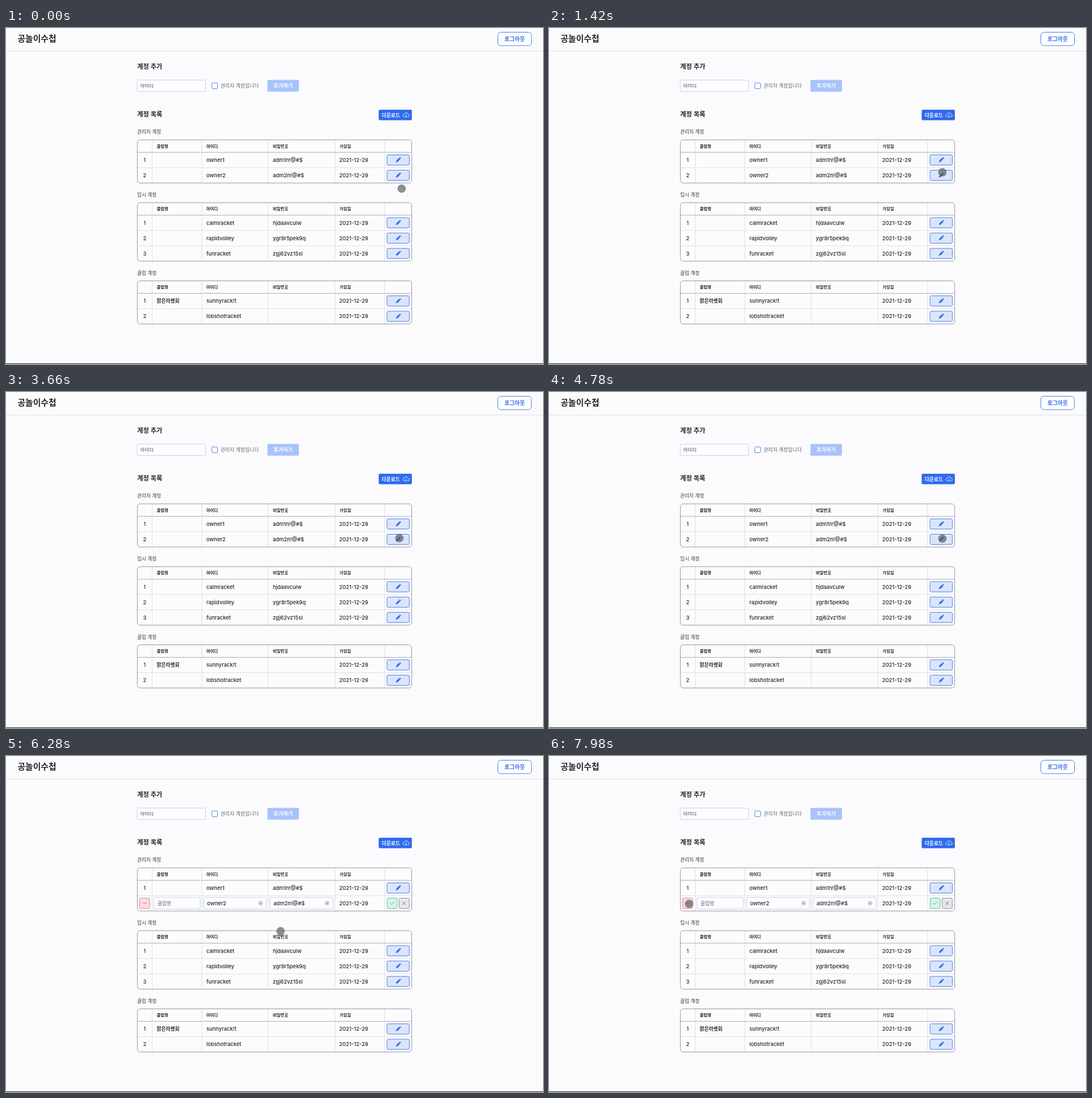
Write an HTML page that moves like this. It is 946 by 592 pixels and loops after 8 s.

```html
<!DOCTYPE html>
<html lang="ko">
<head>
<meta charset="utf-8">
<style>
  html, body { margin: 0; width: 100%; height: 100%; overflow: hidden; background: #fbfbfd; }
  svg { display: block; width: 946px; height: 592px; }
  text { font-family: Inter, "Noto Sans CJK KR", "Noto Sans CJK", sans-serif; white-space: pre; }
</style>
</head>
<body>
<svg id="stage" viewBox="0 0 946 592"></svg>
<script>
const LOOP = 8000;
const EDIT_AT = 5240;
const INK = '#25262b', BLUE = '#2f6bed';
const COLUMNS = [257.5, 345, 462, 579.5, 667];
const HEADINGS = ['클럽명', '아이디', '비밀번호', '가입일'];
const DATE = '2021-12-29';

// y is the vertical centre of the line
const text = (x, y, label, size, { weight = 500, fill = INK, anchor = 'start' } = {}) =>
  `<text x="${x}" y="${y + size * 0.37}" font-size="${size}" font-weight="${weight}" fill="${fill}" text-anchor="${anchor}">${label}</text>`;
const box = (x, y, w, h, r, fill, stroke = 'none', width = 1) =>
  `<rect x="${x}" y="${y}" width="${w}" height="${h}" rx="${r}" fill="${fill}" stroke="${stroke}" stroke-width="${width}"/>`;
const path = (d, stroke, width = 1, fill = 'none') =>
  `<path d="${d}" fill="${fill}" stroke="${stroke}" stroke-width="${width}" stroke-linecap="round" stroke-linejoin="round"/>`;
const rule = (x1, y1, x2, y2, stroke) => path(`M${x1} ${y1}L${x2} ${y2}`, stroke, 0.9);
const cross = (x, y, r, stroke, width) =>
  path(`M${x - r} ${y - r}l${2 * r} ${2 * r}m0 ${-2 * r}l${-2 * r} ${2 * r}`, stroke, width);

const pencil = y => `<g transform="translate(691 ${y}) rotate(45)" fill="${BLUE}">
  <rect x="-1.6" y="-5.6" width="3.2" height="1.9" rx=".7"/>
  <path d="M-1.6-3.1h3.2v6.1L0 6l-1.6-3z"/></g>`;

function row(y, number, [club, id, password]) {
  return text(244.3, y, number, 9.3, { anchor: 'middle' }) +
    text(265.5, y, club, 8.7, { weight: 600 }) +
    text(353, y, id, 9.4) + text(470, y, password, 9.4) + text(587, y, DATE, 9.4) +
    box(671.2, y - 8.9, 39.3, 18, 2, '#dbe5fa', '#4a7fe8') + pencil(y);
}

function editor(y, [, id, password]) {
  const field = (x, w, label, size, fill) =>
    box(x, y - 10.2, w, 20.4, 2, '#fdfdff', '#c3cff0') + text(x + 6, y, label, size, { fill });
  const clear = x => `<circle cx="${x}" cy="${y}" r="4.2" fill="#d3d4d9"/>` + cross(x, y, 1.5, '#85868c', 0.7);
  return box(235.5, y - 9, 17.5, 18.2, 2, '#fadde2', '#e4808f') +
    path(`M241.4 ${y}h5.8`, '#d95d70', 0.9) +
    field(260.7, 81.3, '클럽명', 8.8, '#66676d') +
    field(348.2, 110.8, id, 9.4, INK) + clear(448.5) +
    field(465.3, 110.8, password, 9.4, INK) + clear(565.6) +
    text(587, y, DATE, 9.4) +
    box(671.5, y - 9, 17.5, 18.2, 2, '#d8f4e9', '#50c69b') +
    path(`M677.3 ${y + .2}l2.1 2.1 4-4.4`, '#25ae7b', 0.9) +
    box(692.7, y - 9, 17.6, 18.2, 2, '#e7e8ec', '#8c8e96') + cross(701.4, y, 2.7, '#63656d', 0.9);
}

function table(top, title, rows) {
  const head = top + 22, bottom = head + 27 * rows.length;
  const edited = title === '관리자 계정' ? rows.length - 1 : -1;
  let out = text(231, top - 14, title, 8.7, { fill: '#3c3d43' }) +
    box(231.4, top, 483.3, bottom - top, 5, '#fcfcfe');
  COLUMNS.forEach(x => out += rule(x, top, x, bottom, '#dcdde1'));
  HEADINGS.forEach((label, i) => out += text(COLUMNS[i] + 8, top + 10.7, label, 7.4, { weight: 600 }));
  rows.forEach((cells, i) => {
    const y = head + 27 * i + 13.3;
    if (i) out += rule(231.4, head + 27 * i, 714.7, head + 27 * i, '#dcdde1');
    out += i === edited
      ? `<g id="idle">${row(y, i + 1, cells)}</g><g id="editing">${editor(y, cells)}</g>`
      : row(y, i + 1, cells);
  });
  return out + rule(231.4, head, 714.7, head, '#a3a4a9') +
    box(231.4, top, 483.3, bottom - top, 5, 'none', '#96979d');
}

document.getElementById('stage').innerHTML =
  box(0, 0, 946, 592, 0, '#fbfbfd') +
  box(0, 40, 946, 1, 0, '#dedfe2') + box(0, 591, 946, 1, 0, '#25262a') +
  text(20.5, 18.7, '공놀이수첩', 14.8, { weight: 600 }) +
  box(866.5, 7.5, 59, 23.5, 5, '#fff', '#4a80ee') +
  text(896, 19, '로그아웃', 9.8, { weight: 600, fill: BLUE, anchor: 'middle' }) +
  text(231, 67.6, '계정 추가', 11.3, { weight: 600 }) +
  box(231.2, 91.8, 120.3, 20, 2, '#fdfdff', '#c5cef0') +
  text(236.5, 101.5, '아이디', 8.5, { fill: '#45464c' }) +
  box(362.6, 96.8, 10, 10, 1.5, '#fff', '#4f83e8') +
  text(378, 101.5, '관리자 계정입니다', 8.8, { weight: 400, fill: '#696a70' }) +
  box(460.5, 91.5, 55.5, 20.7, 2, '#a8c3fa') +
  text(488.2, 101.7, '추가하기', 9.2, { weight: 600, fill: '#fff', anchor: 'middle' }) +
  text(231, 152.2, '계정 목록', 11.3, { weight: 600 }) +
  box(656.5, 144, 58.5, 18.6, 2, BLUE) +
  text(662, 153.3, '다운로드', 8.7, { weight: 600, fill: '#fff' }) +
  path('M702.2 156.7h-.3a2.5 2.5 0 0 1-.4-5 3.5 3.5 0 0 1 6.7.2 2.4 2.4 0 0 1-.3 4.8h-.6M704.7 152.5v4.7m-1.5-1.5l1.5 1.5 1.5-1.5', '#fff', 0.8) +
  table(197.1, '관리자 계정', [['', 'owner1', 'adm1n!@#$'], ['', 'owner2', 'adm2n!@#$']]) +
  table(307.8, '임시 계정', [
    ['', 'calmracket', 'hjdaavculw'], ['', 'rapidvolley', 'ygr8r5pek9q'], ['', 'funracket', 'zgj62vz15sl']]) +
  table(445.5, '클럽 계정', [['맑은라켓회', 'sunnyrack!t', ''], ['', 'lobshotracket', '']]) +
  '<circle id="pointer" r="7.1" fill="#555" fill-opacity=".66" stroke="#444" stroke-opacity=".4" stroke-width=".7"/>';

// Pointer waypoints: time, x, y
const ROUTE = [
  [0, 697, 283], [900, 693, 254.5], [1420, 693, 254.2], [3660, 693, 257.4], [4780, 693, 258.3],
  [5400, 693, 258.5], [6280, 484, 308.7], [7120, 272, 296.3], [7660, 247.5, 263], [7980, 246.8, 260.5], [LOOP, 246.8, 260.5]
];

// Monotone slope at a waypoint, so pauses do not overshoot
function slope(i, axis) {
  if (i === 0 || i === ROUTE.length - 1) return 0;
  const [a, b, c] = [ROUTE[i - 1], ROUTE[i], ROUTE[i + 1]];
  const before = (b[axis] - a[axis]) / (b[0] - a[0]), after = (c[axis] - b[axis]) / (c[0] - b[0]);
  return before * after <= 0 ? 0 : 2 * before * after / (before + after);
}

function along(time, axis) {
  const i = Math.max(0, ROUTE.findIndex(p => p[0] > time) - 1);
  const a = ROUTE[i], b = ROUTE[i + 1], span = b[0] - a[0], u = (time - a[0]) / span;
  const ease = u * u * (3 - 2 * u);
  return a[axis] * (1 - ease) + b[axis] * ease +
    span * u * (1 - u) * ((1 - u) * slope(i, axis) - u * slope(i + 1, axis));
}

const [pointer, idle, editing] = ['pointer', 'idle', 'editing'].map(id => document.getElementById(id));
const start = performance.now();

function draw() {
  const time = (performance.now() - start) % LOOP;
  pointer.setAttribute('cx', along(time, 1));
  pointer.setAttribute('cy', along(time, 2));
  const isEditing = time >= EDIT_AT;
  idle.style.display = isEditing ? 'none' : '';
  editing.style.display = isEditing ? '' : 'none';
  requestAnimationFrame(draw);
}
draw();
</script>
</body>
</html>
```
